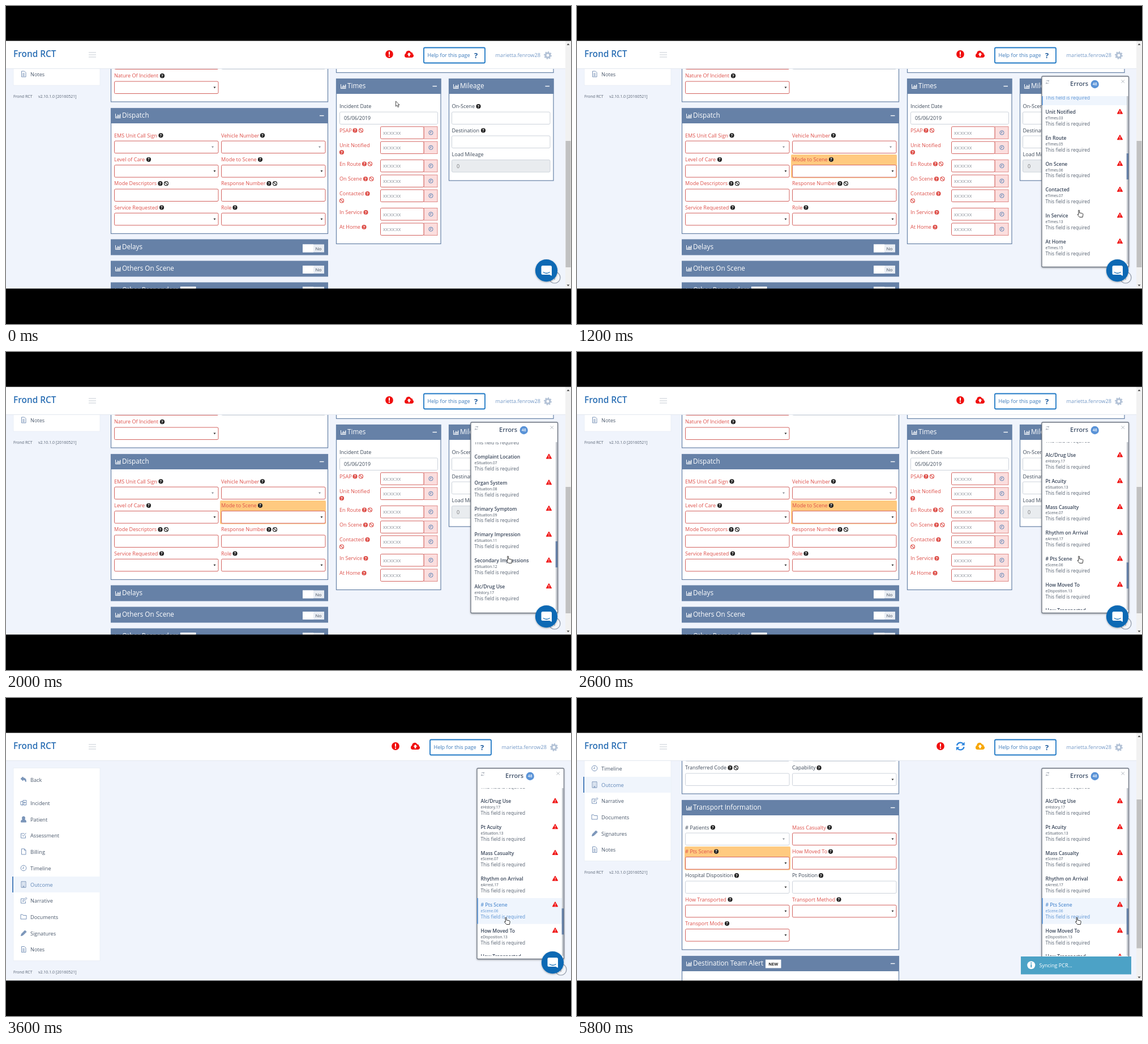
Animation, 998 px wide and 561 px high, one loop 6 s. Source, as an HTML page:

```html
<!DOCTYPE html>
<html lang="en">
<head>
<meta charset="utf-8">
<title>Error list walkthrough</title>
<style>
html, body { margin: 0; width: 100%; height: 100%; overflow: hidden; background: #000; }
svg { display: block; width: 100vw; height: 100vh; font-family: "Open Sans", sans-serif; }
.row .back, .row .edge { display: none; }
.row.on .back, .row.on .edge { display: inline; }
.row.on text { fill: #5b93d3; }
</style>
</head>
<body>
<svg id="stage" viewBox="0 0 998 561"></svg>
<script>
const INK = '#3c4858', RED = '#dd4f49', SLATE = '#6681a7', BLUE = '#2c70b5', GREY = '#cdd3db', ALERT = '#f00f0f';

const rect = (x, y, w, h, fill, more = '') => `<rect x="${x}" y="${y}" width="${w}" height="${h}" fill="${fill}" ${more}/>`;
const circle = (x, y, r, fill, more = '') => `<circle cx="${x}" cy="${y}" r="${r}" fill="${fill}" ${more}/>`;
const path = (d, fill, more = '') => `<path d="${d}" fill="${fill}" ${more}/>`;
const line = (d, color, width = 1) => path(d, 'none', `stroke="${color}" stroke-width="${width}"`);
const at = (x, y, body, more = '') => `<g transform="translate(${x} ${y})" ${more}>${body}</g>`;
const group = (id, body, more = '') => `<g id="${id}" ${more}>${body}</g>`;
// y is the middle of the capitals
const text = (x, y, s, size = 9.05, fill = INK, more = '') =>
  `<text x="${x}" y="${(y + size * 0.36).toFixed(2)}" font-size="${size}" fill="${fill}" ${more}>${s}</text>`;
const bold = 'font-weight="600"', middle = 'text-anchor="middle"';

// Small icons
const help = (x, y, color = '#222') => circle(x, y, 4.1, color) +
  text(x, y, '?', 7, '#fff', `${middle} font-weight="700"`);
const ban = (x, y, color = '#222') => circle(x, y, 3.5, 'none', `stroke="${color}" stroke-width="1.2"`) +
  line(`M${x - 2.4} ${y - 2.4}l4.8 4.8`, color, 1.2);
const clock = (x, y, color, r = 3.6) => circle(x, y, r, 'none', `stroke="${color}"`) +
  line(`M${x} ${y - r * .6}V${y + .4}h${-r * .5}`, color);
const chart = (x, y) => line(`M${x} ${y - 4}v7.5h9`, '#fff') +
  line(`M${x + 2.2} ${y + 2.4}v-2.4m2 2.4v-5m2 5v-3.6m2 3.6v-6`, '#fff', 1.3);
const warning = (x, y) => path(`M${x} ${y - 4.4}l4.7 8.2h-9.4z`, ALERT, `stroke="${ALERT}" stroke-linejoin="round"`) +
  line(`M${x} ${y - 1.8}v3m0 .9v1.2`, '#fff', 1.1);
const exclaim = x => circle(x, 85, 6.9, ALERT) + line(`M${x} 80.6v5.4m0 1.3v2.2`, '#fff', 2);
const cloud = (x, color) => at(x, 84.5,
  path('M-8 2.5a4 4 0 0 1 2.2-3.6a4.8 4.8 0 0 1 9.2-1.6a2.6 2.6 0 0 1 3 3a3.3 3.3 0 0 1-1.2 6.2H-4.4a3.8 3.8 0 0 1-3.6-4z', color) +
  path('M0-2.5l3.5 3.8h-2.1v3h-2.8v-3h-2.1z', '#fff'));
const halfSync = path('M7.4-7.4v6h-6z', '#2e86de') + line('M-6.3-1.3A6.4 6.4 0 0 1 4.8-4.2', '#2e86de', 2.3);

// Form parts
function field(x, y, w, color, kind = '') {
  const tip = x + w - (kind === 'combo' ? 10 : 6.5), mid = y + 10.5;
  const arrow = kind && path(`M${tip - 2} ${mid - 1}h4l-2 3z`, kind === 'combo' ? '#8a8f96' : '#333');
  return rect(x, y, w, 21.5, '#fff', `rx="2" stroke="${color}"`) + arrow;
}
function entry(x, y, label, color, kind, q, b) {
  const edge = color === RED ? '#d3625e' : GREY;
  return text(x, y, label, 9.05, color) + help(q, y) + (b ? ban(b, y) : '') + field(x + .5, y + 9.8, 183.5, edge, kind);
}
function bar(x, y, w, title, h = 27) {
  const mid = y + h / 2 - .5;
  return rect(x, y, w, h, SLATE) + chart(x + 8.5, mid + 1) + text(x + 20, mid, title, 11.7, '#fff');
}
function panel(x, y, w, h, title) {
  return rect(x + .5, y + .5, w - 1, h - 1, '#fff', `stroke="${SLATE}" stroke-width="1.2"`) +
    (title ? bar(x, y, w, title) + line(`M${x + w - 15} ${y + 13.5}h7.5`, '#fff', 1.4) : '');
}
function toggle(y) {
  return rect(524, y, 38, 14, '#e9edf3') + rect(524, y, 19, 14, '#fff') + text(552, y + 7.5, 'No', 8, INK, middle);
}
const badge = (x, y) => rect(x, y - 7.5, 27.5, 15, '#fff') + text(x + 13.7, y, 'NEW', 7.2, '#222', `${middle} font-weight="700"`);
const glow = (x) => rect(x, 262, 187, 41.5, '#ffca80', 'rx="2"');
const stub = (leftColor) => panel(185, 60, 384, 109.5) + field(191.5, 90, 183.5, leftColor) + field(380.5, 90, 183.5, GREY);

function timeRow([label, y, top, q, b, wrapped]) {
  const iy = wrapped ? y + 12.5 : y;
  const only = wrapped === 'help';
  return text(589, y, label, 9.05, RED) + help(q, only ? iy : y, RED) + (b ? ban(b, iy, RED) : '') +
    rect(738, top, 24, 21.5, '#fbdede', 'stroke="#e08a87"') + field(661.5, top, 76.5, '#d3625e') +
    text(666, top + 11, 'xx:xx:xx', 8.6, '#8f959d') + clock(750.5, top + 10.7, '#5580b5');
}

function incidentPage() {
  const times = [
    ['PSAP', 219.5, 212.8, 616.5, 627], ['Unit Notified', 245.5, 239, 593, 0, 'help'],
    ['En Route', 278.5, 271.3, 633, 643], ['On Scene', 305, 298, 635, 645.5],
    ['Contacted', 331, 324, 638.5, 593, 'ban'], ['In Service', 364, 356.5, 635.5], ['At Home', 390, 383, 632.5]];
  return stub('#d3625e') + entry(191, 123.2, 'Nature Of Incident', RED, 'list', 276) +
    panel(583, 60, 384.5, 58) +
    panel(185, 180, 384, 222, 'Dispatch') +
    entry(191, 228.3, 'EMS Unit Call Sign', RED, 'combo', 273.5) + entry(380, 228.3, 'Vehicle Number', RED, 'combo', 453) +
    entry(191, 270.8, 'Level of Care', RED, 'list', 252) +
    group('glowA', glow(378)) + entry(380, 270.8, 'Mode to Scene', RED, 'list', 449) +
    entry(191, 313.2, 'Mode Descriptors', RED, '', 272.5, 283) + entry(380, 313.2, 'Response Number', RED, '', 464.5, 475) +
    entry(191, 355.5, 'Service Requested', RED, 'list', 275) + entry(380, 355.5, 'Role', RED, 'list', 404.5) +
    bar(185, 411.5, 384, 'Delays', 28) + toggle(420.5) +
    bar(185, 449.5, 384, 'Others On Scene', 28) + toggle(458) +
    bar(185, 487.5, 384, 'Other Responders', 28) + badge(308, 502.5) + toggle(495.5) +
    panel(583, 128, 185.5, 292, 'Times') + text(589, 177, 'Incident Date') + field(589.5, 187, 173, GREY) +
    text(597, 198, '05/06/2019', 8.9) + times.map(timeRow).join('') +
    panel(782, 128, 185.5, 180.5, 'Mileage') +
    text(787.5, 177, 'On-Scene') + help(834.5, 177) + field(787.5, 187, 173.5, GREY) +
    text(787.5, 219.5, 'Destination') + help(843, 219.5) + field(787.5, 229, 173.5, GREY) +
    text(787.5, 261.5, 'Load Mileage') + rect(787.5, 271.5, 173.5, 21.5, '#e9ecef', `rx="2" stroke="${GREY}"`) +
    text(796, 282.5, '0', 9, '#777');
}

function outcomePage() {
  return stub(GREY) +
    entry(191, 123.2, 'Transferred Code', INK, '', 270.5, 281) + entry(380, 123.2, 'Capability', INK, 'list', 427.5) +
    panel(185, 180, 384, 264.5, 'Transport Information') +
    entry(191, 228.3, '# Patients', INK, 'combo', 240) + entry(380, 228.3, 'Mass Casualty', RED, 'list', 446) +
    glow(190) + entry(191, 270.8, '# Pts Scene', RED, 'list', 246) + entry(380, 270.8, 'How Moved To', RED, '', 448) +
    entry(191, 313.2, 'Hospital Disposition', INK, 'list', 282) + entry(380, 313.2, 'Pt Position', INK, '', 431) +
    entry(191, 355.5, 'How Transported', RED, 'list', 270.5) + entry(380, 355.5, 'Transport Method', RED, 'list', 462.5) +
    entry(191, 397.8, 'Transport Mode', RED, 'list', 265) +
    panel(185, 455, 384, 80, 'Destination Team Alert') + badge(333, 469);
}

// Sidebar
const sheet = 'M-3.5-5h5l2.5 2.5v7.5h-7.5z';
const sideItems = [
  ['Back', 144, 'M-5-1.5l4-3.5v2c4 0 6 2 5 7c-1-3-2-4-5-4v2z', 1],
  ['Incident', 185.5, 'M-5-3h4v6h-4zM-1-5h6v8h-6zM2-3v4M0-1h4M-3 4.5h1M2 4.5h1'],
  ['Patient', 214, 'M0-5a2.5 2.8 0 0 1 0 5.6a2.5 2.8 0 0 1 0-5.6M-4.5 5c0-4 2-4.5 4.5-4.5s4.5 .5 4.5 4.5z', 1],
  ['Assessment', 242.5, 'M3.5 0v4.5h-8v-8h6M-2.5-1l2 2.5l5-6'],
  ['Billing', 271, sheet + 'M1.5-5v2.5h2.5'],
  ['Timeline', 300, 'M0-4.8a4.8 4.8 0 0 1 0 9.6a4.8 4.8 0 0 1 0-9.6M0-2.5v3h-2'],
  ['Outcome', 329, 'M-4-5.2h8v10.4h-8zM-2-3h1.2m1.6 0h1.2M-2-.6h1.2m1.6 0h1.2M-2 1.8h1.2m1.6 0h1.2M-1 5v-2h2v2'],
  ['Narrative', 357.5, 'M3.5 1v3.5h-8v-8h5.5M-1.5 1.5l.5-2l5.5-5l1.5 1.5l-5.5 5z'],
  ['Documents', 386, 'M-5-4h3.5l1 1.5h5.5v6.5h-10z'],
  ['Signatures', 415, 'M-4.5 4.5l1-3.5l6-6l2.5 2.5l-6 6z', 1],
  ['Notes', 443.5, sheet + 'M-1.8-1h3.6M-1.8 1h3.6M-1.8 3h3.6']];
const sidebar = () => rect(13, 123.5, 153, 340, '#fff', 'stroke="#e6ebf3" stroke-width=".7"') +
  group('current', rect(11, 315, 155, 28, '#f0f5fc') + rect(11, 315, 2, 28, '#4f81bd')) +
  sideItems.map(([name, y, d, solid]) =>
    at(31, y, path(d, solid ? '#7d97ba' : 'none', 'stroke="#6c89b2" stroke-width=".9"')) +
    text(43, y + .3, name, 9.2, name === 'Outcome' ? '#5f86b8' : '#4b596c')).join('') +
  text(13, 483, 'Frond RCT', 7, '#566273') + text(57, 483, 'v2.10.1.0 [20160521]', 7, '#566273');

// Error list
const errors = [
  ['PSAP', 'eTimes.01'], ['Unit Notified', 'eTimes.03'], ['En Route', 'eTimes.05'], ['On Scene', 'eTimes.06'],
  ['Contacted', 'eTimes.07'], ['In Service', 'eTimes.13'], ['At Home', 'eTimes.15'],
  ['Onset Date', 'eSituation.01'], ['Possible Injury', 'eSituation.02'], ['Complaint Type', 'eSituation.03'],
  ['Complaint', 'eSituation.04'], ['Complaint Location', 'eSituation.07'], ['Organ System', 'eSituation.08'],
  ['Primary Symptom', 'eSituation.09'], ['Primary Impression', 'eSituation.11'], ['Secondary Impressions', 'eSituation.12'],
  ['Alc/Drug Use', 'eHistory.17'], ['Pt Acuity', 'eSituation.13'], ['Mass Casualty', 'eScene.07'],
  ['Rhythm on Arrival', 'eArrest.17'], ['# Pts Scene', 'eScene.06'], ['How Moved To', 'eDisposition.13'],
  ['How Transported', 'eDisposition.14']];
const PITCH = 45.73, PTS_SCENE = 20;
const errorRow = ([name, code], i) => at(0, (141.3 + i * PITCH).toFixed(2),
  rect(821, -12, 150, PITCH, '#eff5fd', 'class="back"') + rect(821, -12, 1.8, PITCH, '#5b93d3', 'class="edge"') +
  text(827.5, 0, name, 8.6, '#39465a', bold) + text(827.5, 10.7, code, 6.55, '#4d5866') +
  text(827.5, 21, 'This field is required', 8.36, '#566170') + warning(959, -.8), 'class="row"');
const errorPanel = () =>
  rect(821, 124, 153.5, 336.5, '#fff', 'rx="2" stroke="#6d7581" stroke-width="1.3" filter="url(#soft)"') +
  line('M828.6 133a2.7 2.7 0 0 1 4.8-.3m0-2v2h-2M833.4 135.2a2.7 2.7 0 0 1-4.8 .3m0 2v-2h2', '#a4abb5', .9) +
  line('M961.5 130.3l5.5 5.5m0-5.5l-5.5 5.5', '#adb3bb', .9) +
  text(871, 137.5, 'Errors', 11, '#44556d', bold) + circle(914.7, 138, 7.2, '#5a93d7') +
  text(914.7, 138, '48', 6.8, '#fff', `${middle} ${bold}`) +
  `<g clip-path="url(#listClip)">${group('list', errors.map(errorRow).join(''))}</g>` +
  rect(971, 159, 3, 296, '#c3c7cd') + group('listThumb', rect(970.7, 260, 3.5, 46, SLATE));

const header = () => rect(0, 61, 998, 49.5, '#fff') + rect(0, 110, 998, 1, '#e2e7ef') +
  text(13, 84, 'Frond RCT', 15.4, BLUE, bold) + line('M146 82h13m-13 4h13m-13 4h13', '#c6ccd4', 1);
const headerRight = () =>
  group('iconsA', exclaim(677) + cloud(712, ALERT)) +
  group('iconsB', exclaim(642) + group('sync', halfSync + `<g transform="rotate(180)">${halfSync}</g>`) + cloud(712, '#f7a600')) +
  rect(738, 73.5, 108, 27, '#fff', 'rx="2" stroke="#2079c5" stroke-width="1.8"') +
  text(744.5, 87, 'Help for this page', 9.1, '#3b7abb') + text(830, 87, '?', 13, '#1f5d9f', `${middle} font-weight="700"`) +
  text(944, 87, 'marietta.fenrow28', 9.2, '#7398c6', 'text-anchor="end"') +
  circle(957, 87, 4, 'none', 'stroke="#b4c3d7" stroke-width="3.2"') +
  circle(957, 87, 5.9, 'none', 'stroke="#b4c3d7" stroke-width="2.2" pathLength="16" stroke-dasharray="1"');

const chat = () => circle(969, 479, 10, '#f4f6fa', 'stroke="#8b95a5" stroke-width="1.2"') + line('M966 477l3-3l3 3m-3-3v9', '#8b95a5') +
  circle(954.5, 466.7, 19.6, '#0b69b4', 'filter="url(#soft)"') +
  path('M948 458h13.5a2.5 2.5 0 0 1 2.5 2.5v15.5l-4-2h-12a2.5 2.5 0 0 1-2.5-2.5v-11a2.5 2.5 0 0 1 2.5-2.5z', '#fff') +
  line('M949 469.5q5.7 4 11.5 0', '#0b69b4', 1.3);
const toast = () => rect(784, 456, 195, 31.5, '#4ca2c6') + circle(802.3, 471.3, 7, '#fff') +
  line('M802.3 466.5v2m0 1.3v5.5', '#4ca2c6', 2) + text(816.5, 472, 'Syncing PCR...', 9, '#fff');
const docBar = () => rect(988, 61, 10, 438, '#f1f1f1') + rect(988.5, 0, 9, 1, '#c1c1c1', 'id="docThumb"') +
  path('M990.5 69l2.5-3l2.5 3zM990.5 491.5l2.5 3l2.5-3z', '#505050');
const cursors = () =>
  group('arrow', path('M0 0v9l2.1-1.9l1.6 3.4l1.7-.8l-1.6-3.2h2.8z', '#fff', 'stroke="#222" stroke-width=".8"')) +
  group('hand', path('M-2-6q1.4-1 2 .4v4l5 1q1.4 .4 1.2 2l-.8 4.6h-5.4l-3.6-4.4q0-1.4 2-.4z', '#fff', 'stroke="#222" stroke-width=".9"'));

const stage = document.getElementById('stage');
stage.innerHTML = `<defs>
  <clipPath id="listClip">${rect(819, 159, 153, 296, '#000')}</clipPath>
  <filter id="soft" x="-20%" y="-20%" width="140%" height="140%"><feDropShadow dx="0" dy="1" stdDeviation="1.8" flood-opacity=".35"/></filter></defs>` +
  rect(0, 61, 998, 438, '#f0f4fc') + group('side', sidebar()) +
  group('pageA', incidentPage()) + group('pageB', outcomePage()) + header() +
  group('right', headerRight() + group('panel', errorPanel()) + group('chat', chat())) +
  group('toast', toast()) + group('docBar', docBar()) + cursors() +
  rect(0, 0, 998, 61.5, '#000') + rect(0, 498.5, 998, 62.5, '#000');

const el = id => document.getElementById(id);
const show = (id, on) => el(id).setAttribute('display', on ? 'inline' : 'none');
const move = (id, x, y, turn = 0) => el(id).setAttribute('transform', `translate(${x} ${y}) rotate(${turn})`);
const rows = [...document.querySelectorAll('.row')];

const LOOP = 6000, STEP = 200;
const scrolls = [0, 77, 231, 382, 459.3, 536, 613.5, 691];
// start time, cursor, x, y
const track = [
  [0, 'arrow', 688.5, 168], [200, 'arrow', 675.5, 139], [400, 'hand', 677.5, 89.5], [600, 'arrow', 821, 382],
  [1200, 'hand', 887.7, 366.5], [2800, 'hand', 886, 382], [3000, 'hand', 884, 393.5]];

function draw(now) {
  const t = Math.floor(now % LOOP / STEP) * STEP;
  const first = t < 3600, loading = !first && t < 4800, second = t >= 4800;
  const settling = t === 4800;

  show('pageA', first);
  show('glowA', t >= 1200);
  show('pageB', second);
  move('pageB', 0, settling ? 2.5 : 0);
  move('side', 0, first ? -323.5 : loading ? 0 : settling ? -173.5 : -176);
  show('current', !first);

  move('right', loading ? 11 : 0, 0);
  show('iconsA', !second);
  show('iconsB', second);
  move('sync', 677.3, 85, (t - 4800) * 0.18);
  show('chat', !second);
  show('toast', second);
  el('toast').setAttribute('opacity', settling ? 0.7 : 1);

  show('docBar', !loading);
  const thumb = el('docThumb');
  thumb.setAttribute('y', first ? 238 : settling ? 177 : 179);
  thumb.setAttribute('height', first ? 223 : 262.5);

  show('panel', t >= 1200);
  const scroll = scrolls[Math.max(0, Math.min(scrolls.length - 1, (t - 1200) / STEP))];
  move('list', 0, -scroll);
  move('listThumb', 0, scroll * 0.161);
  const hover = t < 2800 ? 0 : PTS_SCENE;
  rows.forEach((row, i) => row.classList.toggle('on', i === hover));

  const [, kind, x, y] = track.filter(p => p[0] <= t).pop();
  show('arrow', kind === 'arrow');
  show('hand', kind === 'hand');
  move(kind, x, y);
}

const start = performance.now();
function tick() {
  draw(performance.now() - start);
  requestAnimationFrame(tick);
}
tick();
</script>
</body>
</html>
```
